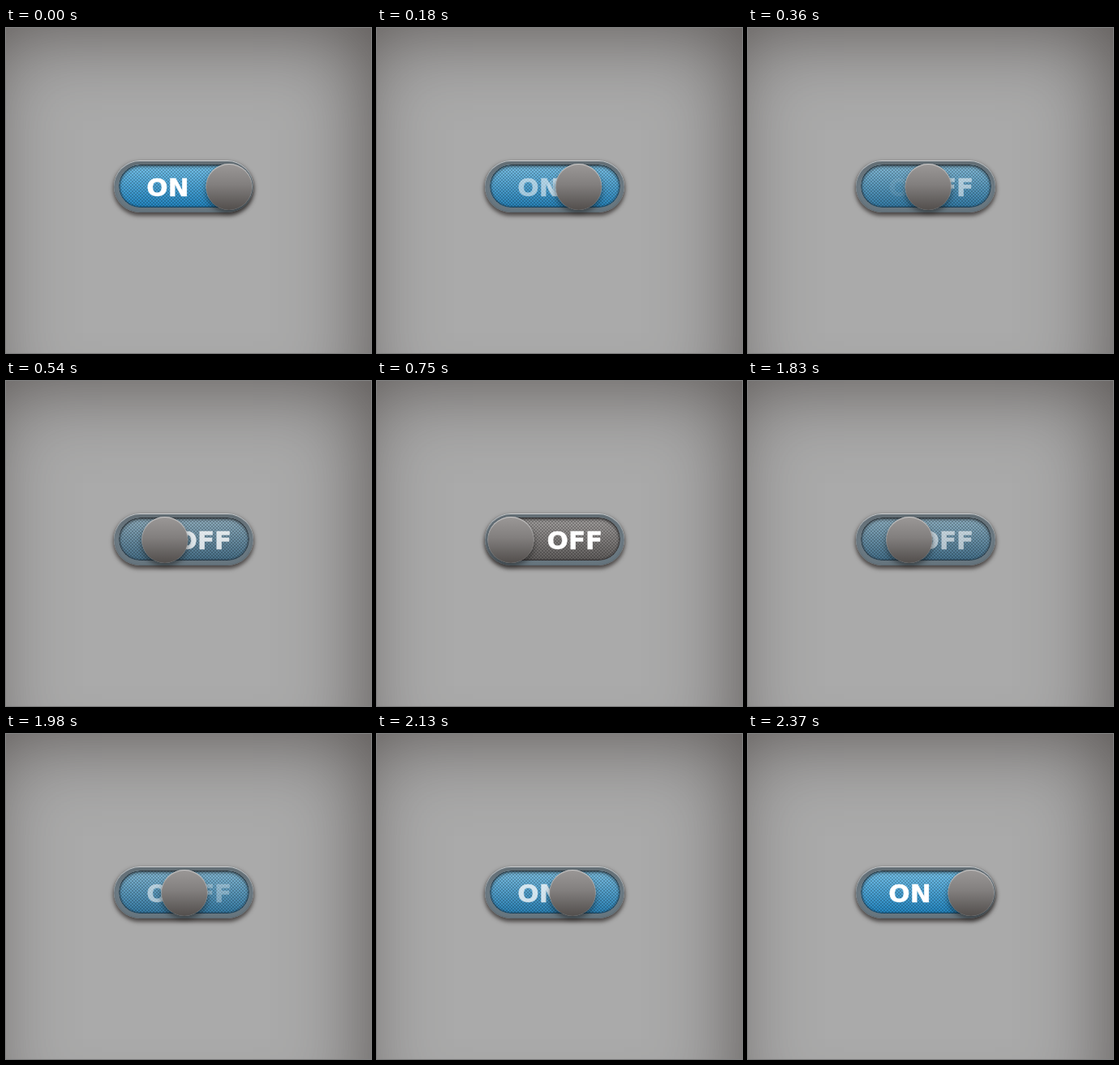
Write an HTML page that moves like this. It is 450 by 400 pixels and loops after 3540 ms.

```html
<!DOCTYPE html>
<html lang="en">
<head>
<meta charset="utf-8">
<title>Toggle switch</title>
<style>
html, body { margin: 0; width: 100%; height: 100%; overflow: hidden; background: #aaa; }
div { position: absolute; box-sizing: border-box; }
#stage { inset: 0; overflow: hidden; }
#vignette {
  inset: 0 0 -100px -30px;
  box-shadow: inset 0 0 104px rgba(68, 62, 59, .84);
}
#track {
  left: 133px; top: 163px; width: 172px; height: 64px; border-radius: 32px;
  background: linear-gradient(#626d74, #6c7a83 50%, #66757e);
  box-shadow: inset 0 1px 1px #d4d6d7, inset 0 0 2px #4a545b,
    0 3px 5px 1px rgba(35, 30, 28, .7);
}
#slot {
  left: 139px; top: 168px; width: 161px; height: 53px;
  border-radius: 27px; overflow: hidden;
}
#slot div { inset: 0; border-radius: 27px; }
#off { background: linear-gradient(#a3a09f, #5f5c5b); }
#on { background: linear-gradient(#78c3ea, #2184bf); }
#slot #mesh {
  --dot: radial-gradient(circle at 1px 1px, rgba(0, 0, 0, .2) .8px, transparent 1.2px);
  background: var(--dot) 0 0 / 4px 4px, var(--dot) 2px 2px / 4px 4px;
  box-shadow: inset 0 2px 4px rgba(20, 18, 18, .7), inset 0 0 2px 1px rgba(30, 30, 35, .6);
}
.label {
  top: 181px; color: #fff; white-space: nowrap;
  font: bold 31px/31px "DejaVu Sans", sans-serif;
  -webkit-text-stroke: .5px #fff;
}
#onText { left: 173.3px; }
#offText { left: 209.6px; }
#knob {
  left: 0; top: 167px; width: 57px; height: 57px; margin-left: -28.5px; border-radius: 50%;
  background: linear-gradient(#9b9897, #827f7e 45%, #524e4c);
  box-shadow: inset 0 1px 1px rgba(225, 225, 225, .7), inset 0 0 1px rgba(190, 190, 190, .5),
    0 4px 6px rgba(15, 15, 15, .5);
}
</style>
</head>
<body>
<div id="stage">
  <div id="vignette"></div>
  <div id="track"></div>
  <div id="slot">
    <div id="off"></div>
    <div id="on"></div>
    <div id="mesh"></div>
  </div>
  <div id="onText" class="label">ON</div>
  <div id="offText" class="label">OFF</div>
  <div id="knob"></div>
</div>
<script>
const LOOP = 3540, TICK = 30;
const $ = id => document.getElementById(id);
const [on, onText, offText, knob] = ["on", "onText", "offText", "knob"].map($);
const clamp = v => Math.max(0, Math.min(1, v));
const fadeOut = (q, rate) => clamp(1 - rate * q);
const fadeIn = q => clamp(1.1 * q);

function draw(now) {
  const tick = Math.floor(now % LOOP / TICK);
  const closing = tick < 53;
  // Switching off takes 25 ticks, switching back on takes 26.
  const q = closing ? clamp(tick / 25) : clamp((tick - 53) / 26);
  const level = closing ? 1 - q : q;

  knob.style.transform = `translateX(${164.5 + 110 * level}px)`;
  on.style.opacity = Math.sin(level * Math.PI / 2);
  onText.style.opacity = closing ? fadeOut(q, 1.93) : fadeIn(q);
  offText.style.opacity = closing ? fadeIn(q) : fadeOut(q, 1.4);
}

const start = performance.now();
function frame() {
  draw(performance.now() - start);
  requestAnimationFrame(frame);
}
frame();
</script>
</body>
</html>
```
